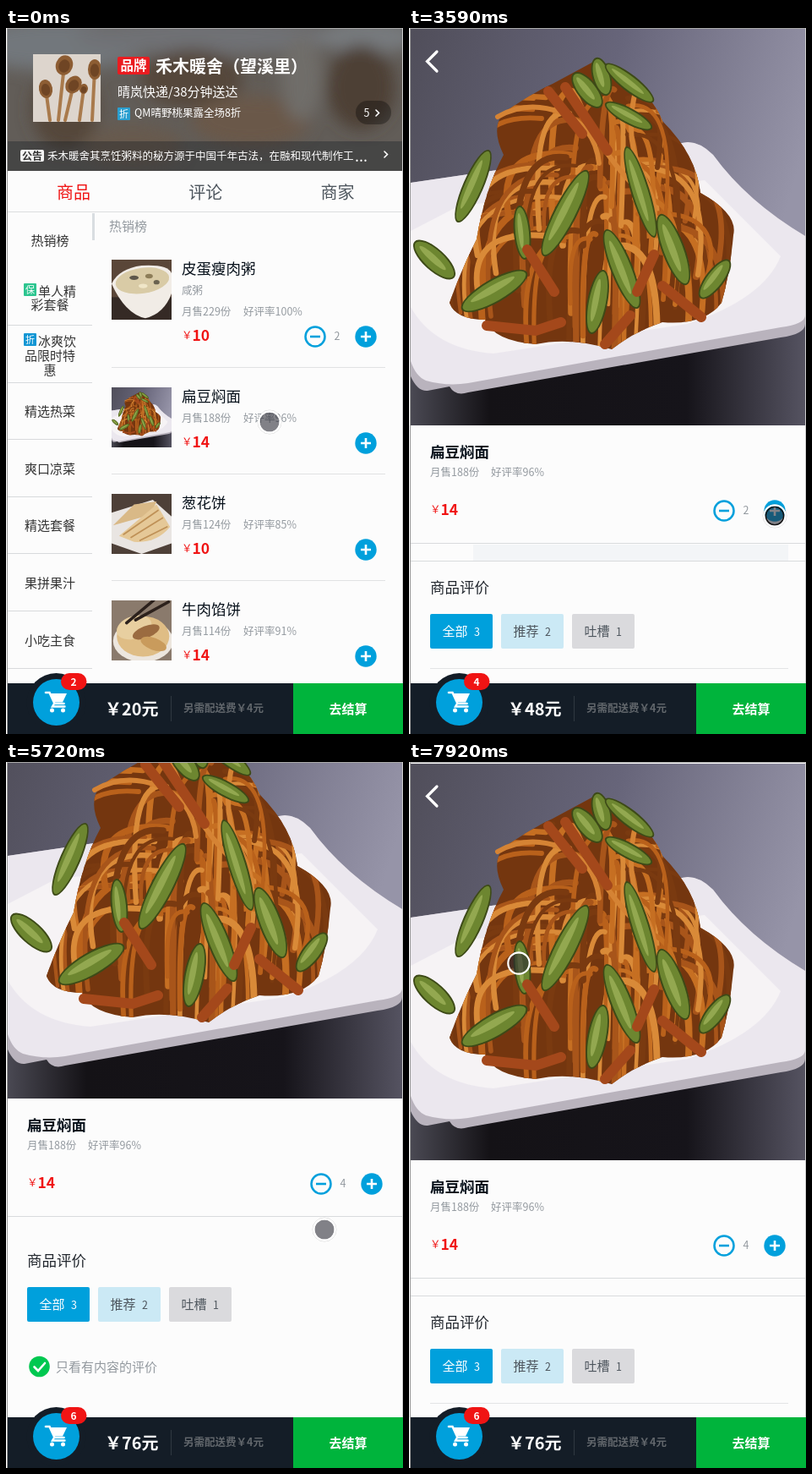
These frames come from a looping animation (470 px wide and 835 px high, 8 s). An HTML page:

```html
<!DOCTYPE html>
<html lang="zh-CN">
<head>
<meta charset="utf-8">
<title>点餐</title>
<style>
html, body { margin: 0; width: 100%; height: 100%; overflow: hidden; background: #fcfcfc; }
svg { display: block; }
#stage { width: 470px; height: 835px; }
text { font-family: "Noto Sans CJK SC", "Noto Sans CJK", "Noto Sans", sans-serif; white-space: pre; }
</style>
</head>
<body>
<svg id="stage" viewBox="0 0 470 835" xmlns="http://www.w3.org/2000/svg"></svg>
<script>
const BLUE = '#00a0dc', RED = '#f01414', GREY = '#93999f', INK = '#07111b', DARK = '#141d27';
const LOOP = 8000;

// ---- drawing helpers (y is the middle of the text line) ----
const text = (x, y, str, size, fill, opt = '') =>
  `<text x="${x}" y="${(y + size * 0.38).toFixed(2)}" font-size="${size}" fill="${fill}" ${opt}>${str}</text>`;
const MID = 'text-anchor="middle"', BOLD = 'font-weight="700"';
const rect = (x, y, w, h, fill, opt = '') =>
  `<rect x="${x}" y="${y}" width="${w}" height="${h}" fill="${fill}" ${opt}/>`;
const disc = (x, y, r, fill, opt = '') => `<circle cx="${x}" cy="${y}" r="${r}" fill="${fill}" ${opt}/>`;
const oval = (x, y, rx, ry, fill, turn = 0) =>
  `<ellipse rx="${rx}" ry="${ry}" fill="${fill}" transform="translate(${x} ${y}) rotate(${turn})"/>`;
const path = (d, fill, opt = '') => `<path d="${d}" fill="${fill}" ${opt}/>`;
const line = (d, color, width, opt = '') =>
  path(d, 'none', `stroke="${color}" stroke-width="${width}" stroke-linecap="round" ${opt}`);

const plus = (x, y) => disc(x, y, 12.7, BLUE) +
  path(`M${x - 6} ${y}h12M${x} ${y - 6}v12`, 'none', 'stroke="#fff" stroke-width="2.6"');
const minus = (x, y) => disc(x, y, 11.5, 'none', `stroke="${BLUE}" stroke-width="2.5"`) +
  path(`M${x - 6} ${y}h12`, 'none', `stroke="${BLUE}" stroke-width="2.6"`);
const price = (x, y, n) => text(x, y, '￥', 12.5, RED) + text(x + 12.5, y, n, 17.5, RED, BOLD);
const tag = (x, y, ch, fill) => rect(x, y, 15, 15, fill, 'rx="1"') +
  text(x + 7.5, y + 7.5, ch, 11, '#fff', MID);

// ---- noodle picture ----
function rng(seed) {
  return () => (seed = (seed * 16807) % 2147483647) / 2147483647;
}

function strands() {
  const rnd = rng(77), tones = ['#c66f22', '#a8551a', '#d98a38', '#7a3a10', '#b9611b'];
  let out = '';
  for (let i = 0; i < 95; i++) {
    const a = rnd() * 2 - 1, top = 70 + rnd() * 190;
    const x1 = 210 + a * 70 + rnd() * 30, x2 = 215 + a * 175, y2 = top + 70 + rnd() * 120;
    const d = `M${x1 | 0} ${top | 0}Q${(x2 + a * 30) | 0} ${(top - 10) | 0} ${x2 | 0} ${y2 | 0}`;
    out += line(d, tones[i % 5], 4 + rnd() * 4);
  }
  return out;
}

const BEANS = [
  [196, 55, 226, 92, 22], [222, 37, 234, 78, 20], [234, 44, 288, 86, 18], [234, 90, 286, 118, 17],
  [258, 142, 290, 246, 20], [210, 170, 160, 268, 25], [298, 222, 328, 302, 25], [234, 240, 270, 330, 24],
  [230, 288, 216, 360, 22], [131, 212, 137, 272, 18], [94, 146, 58, 228, 22], [8, 254, 52, 294, 24],
  [64, 332, 138, 290, 26], [378, 276, 346, 318, 20]
];

function bean([x1, y1, x2, y2, w]) {
  const len = Math.hypot(x2 - x1, y2 - y1) / 2, turn = Math.atan2(y2 - y1, x2 - x1) * 180 / Math.PI;
  const x = (x1 + x2) / 2, y = (y1 + y2) / 2;
  return oval(x, y, len + 2, w / 2 + 1, '#3d4a17', turn) + oval(x, y, len, w / 2 - 1, '#6d8630', turn) +
    oval(x - 2, y - 2, len * 0.7, w / 6, '#93a850', turn);
}

const MOUND = 'M48 325Q60 290 80 250Q90 190 112 150Q95 115 115 98Q150 75 170 66L222 38Q285 70 300 110' +
  'Q340 150 345 195Q390 220 384 245Q380 290 370 325Q350 352 300 348Q265 360 240 380Q190 365 150 374' +
  'Q100 370 90 345Q55 345 48 325Z';

const dish = `<symbol id="dish" viewBox="2 1 467 469" preserveAspectRatio="none">
  ${rect(2, 1, 467, 469, 'url(#slate)')}
  ${path('M2 390L60 425L469 340V470H2Z', 'url(#shade)')}
  ${path('M2 183L330 135Q345 135 360 150Q400 205 469 246V350Q469 362 440 366L70 431Q55 436 48 424L22 429Q10 430 2 412Z', '#b9b3bd')}
  ${path('M2 183L330 135Q345 135 360 150Q400 205 469 246V340Q469 350 440 354L70 420Q45 424 20 417Q8 412 2 394Z', '#ebe7ee')}
  ${path('M2 240L60 210L350 180L440 270Q420 320 330 350L100 385Q30 380 2 330Z', '#f6f3f5')}
  ${path(MOUND, '#74360f')}
  <g clip-path="url(#mound)">${strands()}</g>
  ${line('M196 75Q215 120 236 150T286 205M268 75Q255 130 275 170T290 225M105 105Q140 85 180 100T225 160', '#d58334', 6)}
  ${BEANS.map(bean).join('')}
  ${line('M165 75L205 125M185 70L235 145M140 262L172 312M92 352L150 358L180 348M290 268L270 312M300 305L346 342M262 340L232 374', '#a4481b', 12)}
</symbol>`;

const defs = `<defs>
  <linearGradient id="slate" x2="1" y2=".3"><stop offset="0" stop-color="#504e5a"/><stop offset=".5" stop-color="#67657a"/><stop offset="1" stop-color="#9694a8"/></linearGradient>
  <linearGradient id="shade" x2="1"><stop offset="0" stop-color="#4a4953"/><stop offset=".2" stop-color="#141216"/><stop offset=".7" stop-color="#16141a"/><stop offset="1" stop-color="#555361"/></linearGradient>
  <clipPath id="mound"><path d="${MOUND}"/></clipPath>
  <clipPath id="head"><rect x="2" y="1" width="467" height="168"/></clipPath>
  <filter id="soft"><feGaussianBlur stdDeviation="9"/></filter>
  ${dish}
</defs>`;

// ---- list page ----
const thumb = (x, y, size, art) =>
  `<svg x="${x}" y="${y}" width="${size}" height="${size}" viewBox="0 0 80 80">${art}</svg>`;

const spoon = (x, y, rx, ry, end, turn) => line(`M${x} ${y}L${end} 78`, '#a97a4c', 4) +
  oval(x, y, rx, ry, '#8d5d33', turn) + oval(x, y + 1, rx * 0.65, ry * 0.65, '#6f4524', turn);

const spoons = rect(0, 0, 80, 80, '#ddd5cd') + spoon(15, 41, 8, 11, 20, -10) + spoon(37, 13, 10, 12, 30, 20) +
  spoon(48, 36, 9, 11, 38, 35) + spoon(73, 18, 8, 12, 70, 0) + spoon(60, 41, 5, 6, 55, 10);

const porridge = rect(0, 0, 80, 80, '#5a4638') + rect(0, 50, 80, 30, '#352a25') +
  path('M0 32Q10 12 40 8Q75 6 80 18V45Q70 72 45 78Q18 72 0 32Z', '#f1ece6') +
  oval(41, 28, 36, 17, '#d9cba6', -8) + oval(30, 24, 6, 3, '#5e574b') + oval(50, 22, 5, 3, '#8d7d58') +
  oval(42, 35, 6, 3, '#f0e6c8') + oval(60, 30, 4, 3, '#6a6350');

const pancake = rect(0, 0, 80, 80, '#4e4038') + path('M0 25L55 8L80 30V66L40 80L0 66Z', '#e9e5e2') +
  path('M2 42L30 14L60 10L52 28Z', '#d9b987') + path('M10 56L60 14L78 44Q60 66 30 64Z', '#e5c897') +
  line('M16 54L62 22M26 58L68 32M38 62L74 44', '#bf9157', 2);

const pie = rect(0, 0, 80, 80, '#8a7a6c') + oval(42, 54, 40, 28, '#ece6de') + oval(42, 48, 35, 27, '#dfbd85') +
  oval(30, 36, 24, 15, '#e8cfa0', -18) + oval(46, 42, 19, 8, '#9b6b40', -22) + oval(56, 58, 18, 8, '#c99b5c', 20) +
  line('M20 30L56 0M32 26L76 2', '#2c211c', 4);

function header() {
  return `<g clip-path="url(#head)">${rect(2, 1, 467, 168, '#625d58')}<g filter="url(#soft)">
    ${oval(60, 20, 110, 30, '#72777c')}${oval(240, 10, 160, 22, '#6f7174')}${oval(430, 10, 60, 20, '#777a7e')}
    ${oval(70, 95, 40, 50, '#55473b')}${oval(220, 60, 60, 35, '#55463a')}${oval(290, 110, 70, 30, '#6a5848')}
    ${oval(420, 70, 40, 50, '#4e4136')}${oval(350, 60, 25, 50, '#706d69')}${oval(150, 140, 60, 25, '#675a4e')}</g></g>
    ${thumb(32, 31, 80, spoons)}
    ${rect(132, 34, 38, 21, '#ea1c20', 'rx="2"')}${text(151, 44.5, '品牌', 15.5, '#fff', MID + BOLD)}
    ${text(177, 45, '禾木暖舍（望溪里）', 20, '#fff', BOLD)}
    ${text(132, 75, '晴岚快递/38分钟送达', 15, '#fff')}
    ${tag(132, 94, '折', '#2a9fd0')}${text(152, 100, 'QM晴野桃果露全场8折', 12.5, '#fff')}
    ${rect(414, 86, 42, 28, '#000', 'rx="14" opacity=".32"')}
    ${text(427, 100, '5', 12.5, '#fff', MID)}${line('M438 97l3.5 3.5l-3.5 3.5', '#fff', 1.6)}
    ${rect(2, 134, 467, 35, INK, 'opacity=".3"')}
    ${rect(17, 144, 28, 14, '#f4f4f4', 'rx="2"')}${text(31, 151, '公告', 12, '#333', MID + BOLD)}
    ${text(49, 151, '禾木暖舍其烹饪粥料的秘方源于中国千年古法，在融和现代制作工', 12.5, '#fff')}
    ${text(413, 151, '...', 18, '#fff')}${line('M448 146l3.5 3.5l-3.5 3.5', '#fff', 1.6)}`;
}

function menu() {
  const word = (x, y, s) => text(x, y, s, 15, '#333');
  const names = ['精选热菜', '爽口凉菜', '精选套餐', '果拼果汁', '小吃主食'];
  let out = word(29.5, 251, '热销榜') + tag(21, 302, '保', '#2cc58f') + word(38, 311, '单人精') +
    word(29.5, 327.5, '彩套餐') + tag(21, 361, '折', '#1296d4') + word(38, 370, '冰爽饮') +
    word(22, 387, '品限时特') + word(44.5, 404, '惠');
  names.forEach((s, i) => { out += word(22, 453.5 + i * 67.6, s); });
  for (let i = 0; i < 7; i++) out += rect(2, Math.round(351 + i * 67.6), 100, 1, '#d8dadc');
  return out;
}

function food(y, name, sold, rate, cost, art, note) {
  const drop = note ? 25 : 0;
  return art + text(208, y + 10, name, 17.5, INK) + (note ? text(208, y + 36, note, 12.5, GREY) : '') +
    text(208, y + 36 + drop, `月售${sold}份`, 12.5, GREY) + text(281, y + 36 + drop, `好评率${rate}%`, 12.5, GREY) +
    price(208, y + 64.5 + drop, cost) + plus(426, y + 66 + drop) +
    (y < 677 ? rect(125, y + 102 + drop, 324, 1, '#e1e2e3') : '');
}

function listPage() {
  const tabs = ['商品', '评论', '商家'].map((s, i) =>
    text(80 + i * 156.3, 194, s, 20, i ? '#4d555d' : RED, MID)).join('');
  return header() + tabs + rect(2, 217, 467, 1, '#dcdddf') + menu() +
    rect(102, 219, 3, 32, '#d9dde1') + text(122, 234, '热销榜', 15, GREY) +
    food(274, '皮蛋瘦肉粥', 229, 100, 10, thumb(125, 274, 71, porridge), '咸粥') +
    minus(366, 365) + text(392, 364, '2', 12.5, GREY, MID) +
    food(425, '扁豆焖面', 188, 96, 14, '<use href="#dish" x="125" y="425" width="71" height="71"/>') +
    food(551, '葱花饼', 124, 85, 10, thumb(125, 551, 71, pancake)) +
    food(677, '牛肉馅饼', 114, 91, 14, thumb(125, 677, 71, pie));
}

// ---- detail page ----
function detailPage() {
  const filter = (x, name, n, bg, ink, opt = '') => rect(x, 693, 74, 41, bg, 'rx="2"') +
    text(x + 14.5, 713, name, 15, ink, opt) + text(x + 52, 714, n, 12.5, ink, opt);
  return rect(2, -100, 467, 1100, '#fcfcfc') +
    '<use href="#dish" x="2" y="1" width="467" height="469"/>' +
    line('M33 28L21.500 39.500L33 51', '#fff', 3.2) +
    text(25, 501, '扁豆焖面', 17.5, INK, BOLD) +
    text(25, 525, '月售188份', 12.5, GREY) + text(97, 525, '好评率96%', 12.5, GREY) + price(25, 569, 14) +
    `<g id="control"><g id="less">${minus(0, 0)}</g>` +
    `<g id="qtyBox">${text(0, -1, '1', 12.5, GREY, MID + ' id="qty"')}</g>${plus(433, 571)}</g>` +
    `<g id="add">${rect(355, 556, 92, 30, BLUE, 'rx="15"')}${text(401, 571, '加入购物车', 12.5, '#fff', MID)}</g>` +
    rect(76, 611, 373, 19, '#f3f5f7', 'id="band"') +
    rect(2, 609, 467, 1, '#d9dbdd', 'id="edgeTop"') + rect(2, 630, 467, 1, '#d9dbdd', 'id="edgeLow"') +
    text(25, 661, '商品评价', 17.5, '#22272e') +
    filter(25, '全部', 3, BLUE, '#fff', 'font-weight="500"') + filter(109, '推荐', 2, '#cbe9f5', '#4d555d') +
    filter(193, '吐槽', 1, '#dadadd', '#4d555d') +
    rect(25, 757, 424, 1, '#e3e4e6', 'id="rule"') +
    disc(39.5, 787, 12.3, '#00c850') + line('M33.500 787.500l4.500 4.500l8-9', '#fff', 2.6) +
    text(59, 787, '只看有内容的评价', 15, GREY);
}

// ---- cart bar and pointer ----
function cartBar() {
  return rect(2, 775, 338, 60, DARK) + rect(340, 775, 130, 60, '#00b43c') +
    disc(59.5, 798, 35, DARK) + disc(59.5, 797.5, 27.5, BLUE) +
    line('M47 786h4.500l6 13h11', '#fff', 2.6) + path('M51.500 787h20.500l-5 10.500h-11z', '#fff') +
    line('M57 799l-2 3.500h14.500', '#fff', 2.4) + disc(54.500, 807, 2.5, '#fff') + disc(67.500, 807, 2.5, '#fff') +
    rect(65, 763, 30.5, 20, '#f01414', 'rx="10"') + text(80, 773, '2', 12, '#fff', MID + BOLD + ' id="count"') +
    text(117, 805, '￥20元', 20, '#fff', BOLD + ' id="total"') + rect(195, 790, 1, 30, '#2f3841') +
    text(210, 804, '另需配送费￥4元', 12.5, '#62676c', BOLD) + text(405, 805, '去结算', 15, '#fff', MID + BOLD);
}

const pointer = `<g id="pointer">${disc(0, 0, 14, 'none', 'stroke="#000" stroke-opacity=".14"')}
  ${disc(0, 0, 11.5, '#282832', 'opacity=".58"')}${disc(0, 0, 12.7, 'none', 'stroke="#fff" stroke-width="2.2"')}
  ${disc(0, 0, 10.6, 'none', 'stroke="#111" stroke-width="1.4" id="press"')}</g>`;

const frame = rect(0, 0, 1, 835, '#fff') + rect(1, 0, 1, 835, '#999') + rect(1, 0, 469, 1, '#aaa') +
  rect(469, 0, 1, 775, '#ccc');

document.getElementById('stage').innerHTML = defs + rect(0, 0, 470, 835, '#fcfcfc') + listPage() +
  `<g id="detail">${detailPage()}</g>` + cartBar() + frame + pointer;

// ---- motion ----
// Runs of screen updates: start, interval, number of updates.
const TICKS = [
  [0, 120, 3], [390, 120, 3], [780, 120, 12], [2230, 140, 2], [2490, 120, 6], [3590, 130, 2],
  [3970, 120, 2], [4240, 120, 5], [4870, 120, 2], [5140, 150, 2], [5570, 150, 3], [5990, 150, 2],
  [6260, 120, 4], [6870, 120, 5], [7500, 150, 2], [7770, 150, 2]
];
const PATH = [
  [0, 312, 466], [240, 302, 463], [630, 302, 463], [900, 272, 500], [1500, 390, 615], [1740, 400, 574],
  [1860, 400, 574], [2100, 349, 612], [2370, 352, 610], [2730, 433, 577], [4240, 433, 577],
  [4720, 370, 661], [4870, 370, 620], [5140, 374, 585], [5570, 377, 553], [5990, 377, 553],
  [6620, 175, 363], [7230, 122, 145], [7350, 122, 151], [7500, 124, 185], [7770, 130, 238]
];
const SCROLL = [
  [4720, 0], [4870, -41], [4990, -60], [5140, -69], [5290, -79], [5570, -82], [5720, -72],
  [5870, -70], [5990, -69], [7350, -69], [7500, -35], [7650, 1], [7770, 6], [7920, 1]
];
const SLIDE = [[389, 467], [390, 350], [510, 70], [630, 0]];
const PRESSES = [[240, 390], [1740, 1860], [2850, 2970], [3590, 3720], [3970, 4090], [4720, 5570], [7350, 7920]];
const ADDS = [1860, 2970, 3720, 4240];

const clamp = v => Math.min(1, Math.max(0, v));

function tick(t) {
  const [start, step, n] = TICKS.filter(r => r[0] <= t).pop();
  return start + step * Math.min(n - 1, Math.floor((t - start) / step));
}

function at(keys, t, col = 1) {
  const i = keys.findIndex(k => k[0] > t);
  if (i === 0) return keys[0][col];
  if (i < 0) return keys[keys.length - 1][col];
  const a = keys[i - 1], b = keys[i];
  return a[col] + (b[col] - a[col]) * (t - a[0]) / (b[0] - a[0]);
}

const el = {};
document.querySelectorAll('#stage g[id], #stage text[id], #stage rect[id], #stage circle[id]')
  .forEach(e => { el[e.id] = e; });
const move = (e, x, y, turn = 0) => e.setAttribute('transform', `translate(${x} ${y}) rotate(${turn})`);
const fade = (e, v) => e.setAttribute('opacity', v);

function draw(now) {
  const t = tick(now), within = (a, b) => t >= a && t < b;
  const added = ADDS.filter(a => t >= a).length;

  el.detail.style.display = t < 390 ? 'none' : '';
  move(el.detail, at(SLIDE, t), at(SCROLL, t));

  // The minus button rolls out from under the plus button.
  const left = 1 - clamp((t - 1780) / 400);
  move(el.less, 373 + left * 30, 571, left * 180);
  move(el.qtyBox, 399 + left * 30, 571, left * 180);
  fade(el.control, t < 1780 ? 0 : 1);
  fade(el.less, 1 - left);
  fade(el.qtyBox, 1 - left);
  fade(el.add, 1 - clamp((t - 1760) / 200));
  el.qty.textContent = Math.max(1, added);

  fade(el.band, t < 4870 ? 1 : 0);
  fade(el.edgeTop, within(5990, 7500) ? 0 : 1);
  fade(el.edgeLow, within(5140, 5870) ? 0 : 1);
  fade(el.rule, within(5140, 7500) ? 0 : 1);

  el.count.textContent = 2 + added;
  el.total.textContent = `￥${20 + 14 * added}元`;
  move(el.pointer, at(PATH, t, 1), at(PATH, t, 2));
  fade(el.press, PRESSES.some(p => within(...p)) ? 1 : 0);
}

function loop() {
  draw(performance.now() % LOOP);
  requestAnimationFrame(loop);
}
loop();
</script>
</body>
</html>
```
